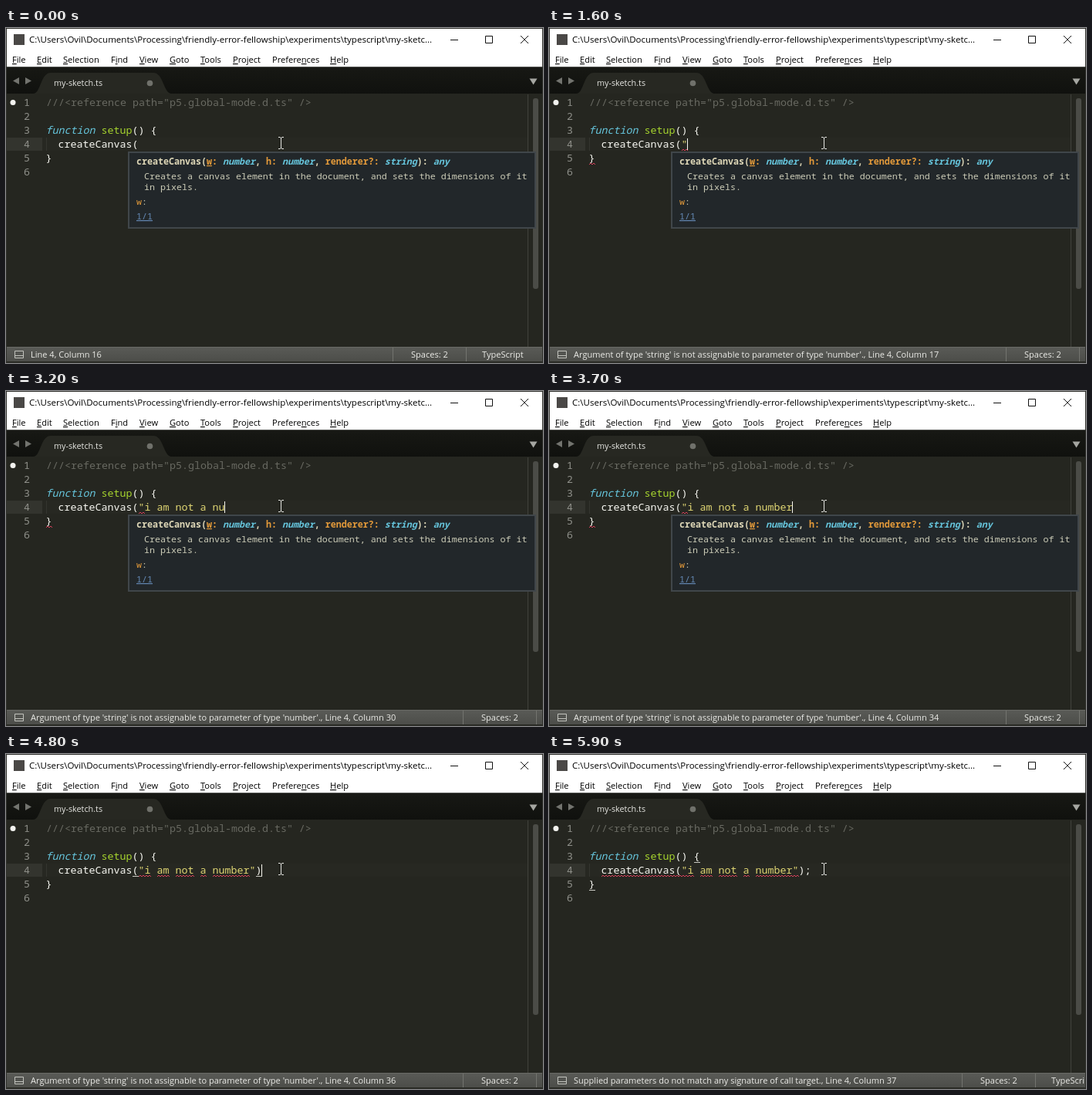
Recreate the animation shown at these times as an HTML page. Size 696 by 434 pixels, loop 6 s.

```html
<!DOCTYPE html>
<html lang="en">
<head>
<meta charset="utf-8">
<title>Code editor</title>
<style>
  html, body { margin: 0; width: 100%; height: 100%; overflow: hidden; background: #252620; }
  svg { display: block; width: 696px; height: 434px; }
  text { white-space: pre; }
  .ui { font-family: "Open Sans", "Noto Sans", sans-serif; font-size: 11.1px; }
  .status { font-size: 11.04px; fill: #ecece8; }
  .code { font-family: "Noto Sans Mono", "DejaVu Sans Mono", monospace; font-size: 13.333px; fill: #f8f8f2; }
  .code text { font-weight: 500; }
  .code .num, .code .comment { font-weight: 400; }
  .tip { font-family: "Noto Sans Mono", "DejaVu Sans Mono", monospace; font-size: 11.667px; fill: #cdcdb8; }
  .sig { font-weight: 700; fill: #dfd8b8; }
  .num { fill: #8f908a; text-anchor: end; }
  .comment { fill: #686961; }
  .type { fill: #66c5dc; font-style: italic; }
  .name { fill: #a6d32e; }
  .str { fill: #e0d673; }
  .arg { fill: #e39a3a; }
  .u { text-decoration: underline; }
  .wave { fill: none; stroke: #d8405c; stroke-width: 1; }
  .line { fill: none; stroke: #c9c9c2; stroke-width: 1; }
</style>
</head>
<body>
<svg viewBox="0 0 696 434">
  <defs>
    <linearGradient id="strip" x2="0" y2="1">
      <stop offset="0" stop-color="#171814"/><stop offset="1" stop-color="#10110e"/>
    </linearGradient>
    <linearGradient id="bar" x2="0" y2="1">
      <stop offset="0" stop-color="#5a5b57"/><stop offset="1" stop-color="#4c4d49"/>
    </linearGradient>
    <clipPath id="inside"><rect x="1" y="412" width="693" height="20"/></clipPath>
  </defs>

  <!-- window, title and menu -->
  <rect width="696" height="434" fill="#252620"/>
  <rect x="1" y="1" width="694" height="49.500" fill="#fff"/>
  <rect x="10" y="8" width="14" height="14" fill="#4a4846"/>
  <text class="ui" x="30" y="19" style="font-size:11.54px">C:\Users\Ovil\Documents\Processing\friendly-error-fellowship\experiments\typescript\my-sketc...</text>
  <path d="M576 15.5h10M621.5 10.5h9v9h-9zM667 10l10 10M677 10l-10 10" fill="none" stroke="#111"/>
  <g class="ui" id="menu"></g>

  <!-- tabs -->
  <rect x="1" y="50.500" width="694" height="34.500" fill="url(#strip)"/>
  <path d="M36 85C45 84 45 58 58 58H191C204 58 204 84 214 85Z" fill="#272822"/>
  <text class="ui" x="62" y="75" style="font-size:10.8px" fill="#e6e6e2">my-sketch.ts</text>
  <circle cx="186.500" cy="71.500" r="3.800" fill="#70716b"/>
  <path d="M17 64v9l-8-4.500zM25 64v9l8-4.500z" fill="#73746f"/>
  <path d="M678.500 65.500h10l-5 8z" fill="#a5a6a1"/>

  <!-- editor -->
  <rect x="1" y="85" width="694" height="328" fill="#252620"/>
  <rect x="1" y="142" width="46" height="17" fill="#33342e"/>
  <rect x="47" y="142" width="629" height="17" fill="#272822"/>
  <path d="M52.500 142v17" stroke="#34352f"/>
  <path d="M676.500 86V413" stroke="#42433d"/>
  <rect x="683" y="91" width="7" height="247" rx="3" fill="#4b4c47"/>
  <circle cx="9" cy="96.500" r="3.500" fill="#f4f4f0"/>
  <g class="code" id="numbers"></g>
  <g class="code">
    <text class="comment" x="52" y="101">///&lt;reference path="p5.global-mode.d.ts" /&gt;</text>
    <text x="51.500" y="137"><tspan class="type">function</tspan> <tspan class="name">setup</tspan>() {</text>
    <text x="67.500" y="155">createCanvas(<tspan class="str" id="typed"></tspan><tspan id="tail"></tspan></text>
    <text x="51.500" y="173">}</text>
  </g>
  <path id="wave" class="wave"/>
  <path id="pair" class="line"/>
  <rect id="caret" y="143" width="1" height="15" fill="#f8f8f0"/>
  <path d="M353 141.500h2l1.500 1 1.500-1h2M353 156.500h2l1.500-1 1.500 1h2M356.500 142v14" fill="none" stroke="#e4e4e0"/>

  <!-- signature popup -->
  <g id="popup" class="tip">
    <rect x="159" y="161" width="527" height="98" fill="#22272a" stroke="#40464a" stroke-width="2"/>
    <text class="sig" x="169" y="177">createCanvas(<tspan class="arg u">w</tspan><tspan class="arg">:</tspan> <tspan class="type">number</tspan>, <tspan class="arg">h:</tspan> <tspan class="type">number</tspan>, <tspan class="arg">renderer?:</tspan> <tspan class="type">string</tspan>): <tspan class="type">any</tspan></text>
    <text x="179" y="196">Creates a canvas element in the document, and sets the dimensions of it</text>
    <text x="179" y="210">in pixels.</text>
    <text x="169" y="229"><tspan class="arg">w</tspan>:</text>
    <text class="u" x="169" y="248" fill="#6489b5">1/1</text>
  </g>

  <!-- status bar -->
  <rect x="1" y="413" width="694" height="19" fill="url(#bar)"/>
  <path d="M1 413.500h694" stroke="#686964"/>
  <path d="M11.500 418.500h11v9h-11zM12 424.500h10" fill="none" stroke="#c3c4be"/>
  <g class="ui status" clip-path="url(#inside)">
    <text id="message" x="32" y="427"></text>
    <g id="right">
      <path d="M501.500 414v18M596.500 414v18" stroke="#73746f"/>
      <text x="525" y="427">Spaces: 2</text>
      <text x="617" y="427">TypeScript</text>
    </g>
  </g>

  <path d="M.5.5h695v433H.5z" fill="none" stroke="#30312d"/>
</svg>

<script>
const $ = id => document.getElementById(id);
const LOOP = 6000, CHAR = 8, CODE_X = 68;
const CALL = 'createCanvas(';
const TYPED = '"i am not a number");';
const STRING_LEN = TYPED.indexOf(')');
const KEYS = [800, 1700, 1820, 1950, 2080, 2220, 2350, 2470, 2580, 2700, 2820,
  2920, 3020, 3140, 3400, 3500, 3600, 3700, 4600, 4700, 5500];
const CARET = [[800, 3900], [4600, 5100], [5500, 5900]];
const MISMATCH = "Argument of type 'string' is not assignable to parameter of type 'number'., ";
const NO_MATCH = 'Supplied parameters do not match any signature of call target., ';

// label, x, index of the underlined letter
const MENU = [['File', 8, 0], ['Edit', 40, 0], ['Selection', 74, 0], ['Find', 136, 1], ['View', 173, 0],
  ['Goto', 212, 0], ['Tools', 252, 0], ['Project', 294, 0], ['Preferences', 345, 7], ['Help', 420, 0]];
$('menu').innerHTML = MENU.map(([s, x, i]) =>
  `<text x="${x}" y="45">${s.slice(0, i)}<tspan class="u">${s[i]}</tspan>${s.slice(i + 1)}</text>`).join('');
$('numbers').innerHTML = [1, 2, 3, 4, 5, 6].map(n =>
  `<text class="num" x="31" y="${83 + 18 * n}">${n}</text>`).join('');

const zigzag = (x, y) => `M${x} ${y}l2-2 2 2 2-2 2 2`;

// wavy line below the visible characters from..to of the fourth line
function squiggle(from, to) {
  return [...(CALL + TYPED)].map((c, i) =>
    i >= from && i < to && c !== ' ' ? zigzag(CODE_X + i * CHAR, 159) : '').join('');
}

function wavePath(t) {
  const open = CALL.length;
  if (t < 900) return '';
  if (t < 4000) return squiggle(open, open + 1) + zigzag(52, 177);
  if (t < 4850) return squiggle(open, open + STRING_LEN - 1);
  return squiggle(0, open + STRING_LEN);
}

// underlines of the bracket pair next to the caret
function pairPath(t) {
  if (t < 4700) return '';
  return t < 5500 ? 'M164 158.5h8M324 158.5h8' : 'M188 140.5h8M52 176.5h8';
}

function draw(t) {
  const n = KEYS.filter(k => k <= t).length;
  $('typed').textContent = TYPED.slice(0, Math.min(n, STRING_LEN));
  $('tail').textContent = TYPED.slice(STRING_LEN, Math.max(n, STRING_LEN));
  $('wave').setAttribute('d', wavePath(t));
  $('pair').setAttribute('d', pairPath(t));

  const on = CARET.some(([a, b]) => t >= a && t < b);
  $('caret').setAttribute('x', CODE_X + (CALL.length + n) * CHAR - 1);
  $('caret').setAttribute('visibility', on ? 'visible' : 'hidden');
  $('popup').setAttribute('visibility', t < 4800 ? 'visible' : 'hidden');

  const [error, shift] = t < 900 ? ['', 0] : t < 4850 ? [MISMATCH, 91] : [NO_MATCH, 34];
  $('message').textContent = `${error}Line 4, Column ${16 + n}`;
  $('right').setAttribute('transform', `translate(${shift})`);
}

const start = performance.now();
function tick() {
  draw((performance.now() - start) % LOOP);
  requestAnimationFrame(tick);
}
tick();
</script>
</body>
</html>
```
